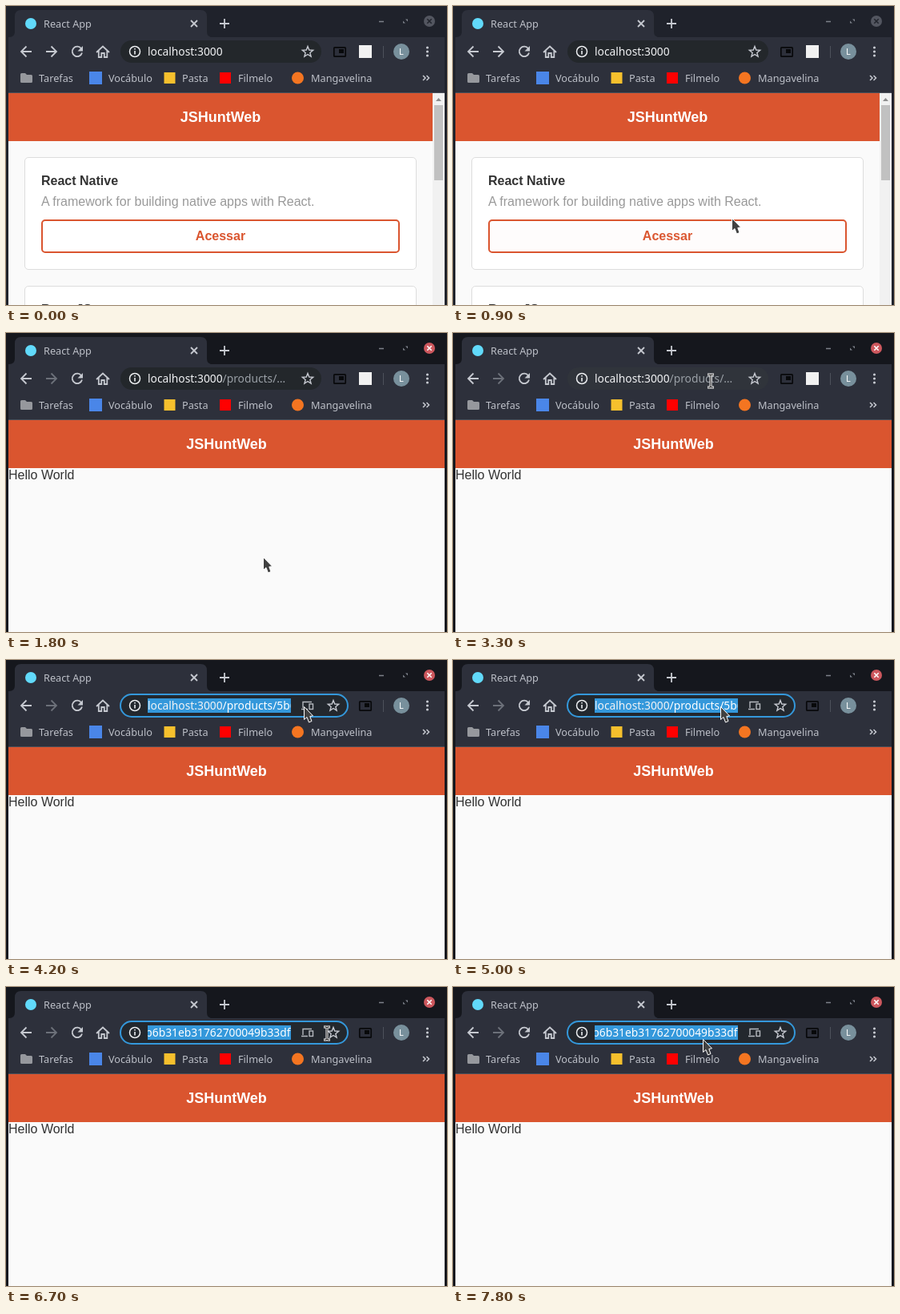
Write an HTML page that moves like this. It is 551x374 px and loops after 8 s.

```html
<!DOCTYPE html>
<html lang="pt">
<head>
<meta charset="utf-8">
<title>React App</title>
<style>
  html, body { margin: 0; width: 100%; height: 100%; overflow: hidden; background: #15171d; }
  svg { display: block; }
  .ui { font-family: "Noto Sans", "Open Sans", sans-serif; font-size: 12.7px; fill: #bdc0c8; }
  .web { font-family: "Liberation Sans", Arial, sans-serif; font-size: 16px; fill: #333; }
  .bold { font-weight: bold; }
  .mid { text-anchor: middle; }
  .line { fill: none; stroke: #c6c9d0; stroke-width: 1.8; }
  .card { fill: #fff; stroke: #ddd; }
  #url { font-size: 13.8px; }
</style>
</head>
<body>
<svg id="stage" width="551" height="374" viewBox="0 0 551 374">
  <!-- window frame -->
  <rect id="strip" width="551" height="374"/>
  <path fill="#2d303b" d="M3 39H4Q11 39 11 32V13Q11 5 19 5H243Q251 5 251 13V32Q251 39 258 39H548V109H3Z"/>
  <circle cx="31" cy="22" r="7" fill="#61dafb"/>
  <text class="ui" x="47" y="27">React App</text>
  <path class="line" stroke-width="1.5" d="M231 18l8 8m0-8l-8 8M267 22h12m-6-6v12"/>
  <path d="M466 19.5h6" stroke="#7d818a" stroke-width="1.5"/>
  <path d="M499 16.5h3v3zM496 18.5v3h3z" fill="#7d818a"/>
  <circle id="close" cx="529" cy="19" r="7"/>
  <path id="closeX" d="M526.3 16.3l5.4 5.4m0-5.4l-5.4 5.4" stroke-width="1.6"/>

  <!-- toolbar -->
  <path class="line" d="M32 57H19.5M25.5 50.5L19 57l6.5 6.5"/>
  <path class="line" id="fwd" d="M50 57h12.500M56.500 50.500L63 57l-6.500 6.500"/>
  <path class="line" d="M94 53.200A6.200 6.200 0 1 0 95 58.500"/>
  <path d="M96 50v6.500h-6.500z" fill="#c6c9d0"/>
  <path class="line" d="M113 58l8-7.500 8 7.500M115.800 56v8h3.500v-5h3.500v5h3.500v-8"/>
  <rect id="pill" x="143" y="43" height="28" rx="14" stroke-width="2"/>
  <circle cx="161" cy="57" r="6.500" fill="none" stroke="#eceef0" stroke-width="1.500"/>
  <path d="M161 56v4.500M161 53v1.600" stroke="#eceef0" stroke-width="1.600"/>
  <svg id="clip" x="177" y="46" width="179" height="22">
    <rect id="sel" y="2" height="18" fill="#3498db"/>
    <text class="ui" id="url" y="16"><tspan id="host">localhost:3000</tspan><tspan id="path"></tspan><tspan id="key"></tspan></text>
  </svg>
  <g id="device" fill="none" stroke="#b4b8be" stroke-width="1.400">
    <path d="M369 61.500h8M371 60v-7.500h11"/>
    <rect x="379" y="55" width="4.500" height="6.500"/>
  </g>
  <path class="line" id="star" style="stroke-width:1.400"/>
  <g id="pip">
    <rect x="409.800" y="51.800" width="14.400" height="11.400" rx="1" fill="none" stroke="#08090b" stroke-width="1.700"/>
    <rect x="416" y="54" width="6" height="5" fill="#08090b"/>
  </g>
  <rect id="ext" x="441" y="49" width="16" height="16" fill="#f1f1f1"/>
  <path d="M471.500 50v15" stroke="#4d515b"/>
  <circle cx="494" cy="57" r="10" fill="#78909c"/>
  <text class="ui mid" x="494" y="61" style="font-size:11px;fill:#fff">L</text>
  <g fill="#c6c9d0">
    <circle cx="526.500" cy="52" r="1.600"/><circle cx="526.500" cy="57" r="1.600"/><circle cx="526.500" cy="62" r="1.600"/>
  </g>

  <!-- bookmarks -->
  <path fill="#96989d" d="M18 85.500Q18 84 19.500 84H24l2 2h5.500Q33 86 33 87.500V94.500Q33 96 31.500 96h-12Q18 96 18 94.500z"/>
  <rect x="104" y="82" width="16" height="16" fill="#4a86e8"/>
  <rect x="197.500" y="83" width="14" height="14" fill="#f6c02d"/>
  <rect x="267" y="83" width="14" height="14" fill="#f00"/>
  <circle cx="364.500" cy="90" r="7.500" fill="#f47521"/>
  <g class="ui">
    <text x="41" y="95">Tarefas</text>
    <text x="128" y="95">Vocábulo</text>
    <text x="220" y="95">Pasta</text>
    <text x="290" y="95">Filmelo</text>
    <text x="381" y="95">Mangavelina</text>
  </g>
  <path class="line" style="stroke-width:1.500" d="M521 87l3 3-3 3m4.500-6l3 3-3 3"/>
  <path d="M3 108.500h545" stroke="#4b4f59"/>

  <!-- page -->
  <rect x="3" y="109" width="545" height="265" fill="#fafafa"/>
  <rect x="3" y="109" width="545" height="60" fill="#da552f"/>
  <text class="web bold mid" id="title" y="145" style="font-size:18px;fill:#fff">JSHuntWeb</text>
  <g id="list">
    <rect class="card" x="23.500" y="189.500" width="489" height="140" rx="4.500"/>
    <text class="web bold" x="44" y="224">React Native</text>
    <text class="web" x="44" y="250" style="fill:#999">A framework for building native apps with React.</text>
    <rect id="btn" x="45" y="268" width="446" height="40" rx="4" stroke="#da552f" stroke-width="2"/>
    <text class="web bold mid" id="label" x="268" y="293">Acessar</text>
    <rect class="card" x="23.500" y="350.500" width="489" height="140" rx="4.500"/>
    <text class="web bold" x="44" y="385">ReactJS</text>
    <rect x="533" y="109" width="15" height="265" fill="#f1f1f1"/>
    <rect x="535" y="124" width="11" height="94" fill="#c1c1c1"/>
    <path d="M537 119l3.500-4 3.500 4z" fill="#8c8c8c"/>
  </g>
  <text class="web" id="hello" x="3" y="183">Hello World</text>

  <!-- pointers -->
  <path id="arrow" fill="#414141" stroke="#fff" stroke-linejoin="round"
        d="M.500 .500V16.500L4 13.500L6.500 20L10 18.500L7.800 12.500L11.500 11.800Z"/>
  <g id="beam" fill="none">
    <path d="M-4-8h3l1 1 1-1h3M-4 8h3l1-1 1 1h3M0-7V7" stroke="#fff" stroke-width="3"/>
    <path d="M-3.500-8h2.500l1 1 1-1h2.500M-3.500 8h2.500l1-1 1 1h2.500M0-7V7" stroke="#1c1c1c" stroke-width="1.100"/>
  </g>
</svg>
<script>
const LOOP = 8000;
const $ = id => document.getElementById(id);
const set = (id, attrs) => { for (const k in attrs) $(id).setAttribute(k, attrs[k]); };
const show = (id, on) => { $(id).style.display = on ? '' : 'none'; };
const mix = (a, b, k) => `rgb(${a.map((v, i) => Math.round(v + (b[i] - v) * k))})`;

const WHITE = [255, 255, 255], ORANGE = [218, 85, 47];
const KEY = '5b6b31eb31762700049b33df';
const KEY_X = 161.6;

// start time, then one position per 100 ms
const moves = [
  ['arrow', 600, [402, 366], [388, 345], [362, 313], [348, 265], [337, 266], [329, 270], [324, 275], [322, 279], [321, 280]],
  ['arrow', 2800, [328, 262], [341, 215], [349, 160], [346, 112], [333, 77]],
  ['beam', 3300, [322, 60]],
  ['arrow', 4100, [340, 58], [372, 58], [383, 57], [346, 58], [299, 58]],
  ['arrow', 4800, [290, 57], [382, 55], [334, 58]],
  ['beam', 5700, [339, 58]],
  ['beam', 5900, [342, 58], [345, 58]],
  ['beam', 6300, [351, 58], [362, 58], [376, 58], [390, 58], [401, 58], [407, 58]],
  ['arrow', 7200, [405, 57]],
  ['arrow', 7500, [415, 61], [389, 69], [343, 69], [312, 65]]
];

function pointerAt(t) {
  const m = moves.filter(r => r[1] <= t).pop();
  if (!m) return null;
  const [kind, start, ...pts] = m;
  const [x, y] = pts[Math.min(pts.length - 1, Math.floor((t - start) / 100))];
  return { kind, x, y };
}

function starPath(cx, cy) {
  let d = '';
  for (let i = 0; i < 10; i++) {
    const r = i % 2 ? 3 : 7, a = (i / 5 - 0.5) * Math.PI;
    d += (i ? 'L' : 'M') + (cx + r * Math.cos(a)).toFixed(2) + ' ' + (cy + r * Math.sin(a)).toFixed(2);
  }
  return d + 'Z';
}

function drawUrl(t, opened, editing, pointer) {
  const all = t >= 3600 && t < 5400;
  const drag = t >= 6300;
  const scrolled = t >= 6500;
  const hover = t >= 3300 && !editing;
  set('pill', {
    width: editing ? 284 : 251,
    fill: editing ? '#23282e' : hover ? '#30343b' : '#23272b',
    stroke: editing ? '#3498db' : 'none'
  });
  $('path').textContent = !opened ? '' : editing ? '/products/' : '/products/…';
  $('key').textContent = editing ? KEY : '';
  if (!opened) $('path').textContent = '';
  set('host', { fill: '#f2f3f5' });
  set('path', { fill: all || scrolled ? '#fff' : '#9aa0a6' });
  set('key', { fill: all || drag ? '#fff' : '#9aa0a6' });
  set('url', { x: scrolled ? 178.5 : 0, 'text-anchor': scrolled ? 'end' : 'start' });
  const from = all || scrolled ? 0 : KEY_X;
  const to = drag && !scrolled ? Math.min(179, pointer.x - 177) : 179;
  set('sel', { x: from, width: all || drag ? to - from : 0 });
  set('star', { d: starPath(editing ? 409 : 377, 57.5) });
  set('pip', { transform: `translate(${editing ? 32 : 0} 0)` });
  show('device', editing);
  show('ext', !editing);
}

function draw(t) {
  const focused = t >= 1700, opened = t >= 1800, editing = t >= 3500;
  const pointer = pointerAt(t);

  set('strip', { fill: focused ? '#15171d' : '#1f222b' });
  set('close', { fill: focused ? '#cc575d' : '#535660' });
  set('closeX', { stroke: focused ? '#fff' : '#22252d' });
  $('fwd').style.stroke = opened ? '#6c7079' : '#c6c9d0';

  const fill = t < 900 ? 0 : t < 1000 ? 0.015 : t < 1100 ? 0.68 : 1;
  set('btn', { fill: mix(WHITE, ORANGE, fill) });
  $('label').style.fill = mix(ORANGE, WHITE, fill);
  set('title', { x: opened ? 275.5 : 268 });
  show('list', !opened);
  show('hello', opened);

  drawUrl(t, opened, editing, pointer);

  for (const kind of ['arrow', 'beam']) {
    const on = pointer && pointer.kind === kind;
    show(kind, on);
    if (on) set(kind, { transform: `translate(${pointer.x} ${pointer.y})` });
  }
}

let last = -1;
function tick() {
  const t = Math.floor(performance.now() % LOOP / 100) * 100;
  if (t !== last) draw(last = t);
  requestAnimationFrame(tick);
}
tick();
</script>
</body>
</html>
```
